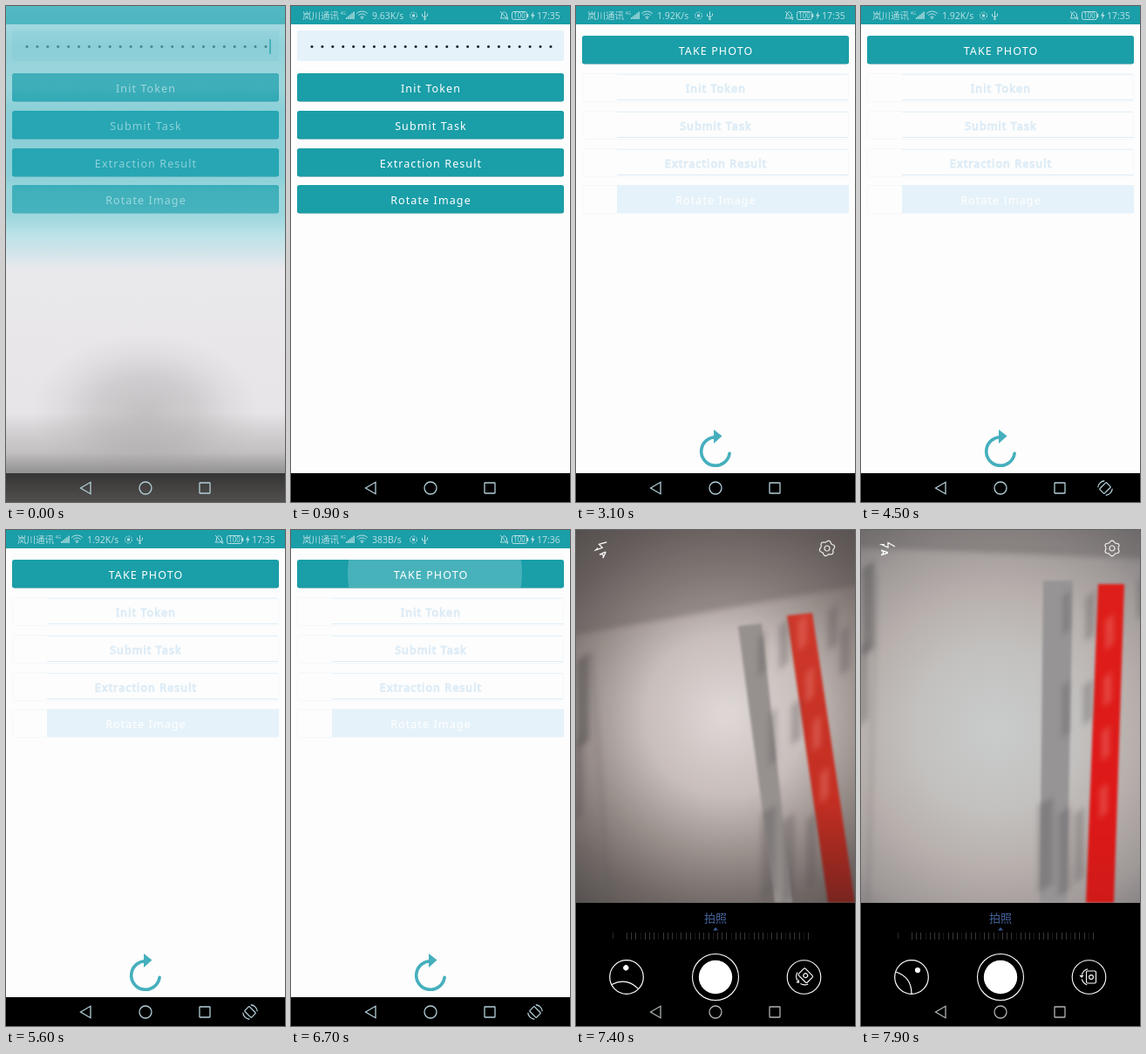
These frames come from a looping animation (320x568 px, 8 s). An HTML page with a canvas:

```html
<!DOCTYPE html>
<html lang="zh">
<head>
<meta charset="utf-8">
<title>Rotate Image demo</title>
<style>
html, body { margin: 0; width: 100%; height: 100%; overflow: hidden; background: #000; }
canvas { display: block; width: 320px; height: 568px; }
</style>
</head>
<body>
<canvas id="stage" width="320" height="568"></canvas>
<script>
const c = document.getElementById('stage').getContext('2d');
const LOOP = 8000, STEP = 100, W = 320, H = 568, NAV = 535, VIEW = 427;
const TEAL = '#1a9ea8', PAPER = '#fdfdfd', FIELD = '#e6f2f9';
const SANS = '"Noto Sans", "Noto Sans CJK SC", sans-serif';
const BUTTONS = [['Init Token', 77], ['Submit Task', 120], ['Extraction Result', 163], ['Rotate Image', 205]];

const clamp = v => Math.max(0, Math.min(1, v));
const mix = (a, b, u) => a + (b - a) * u;
const blend = (a, b, u) => `rgb(${a.map((v, i) => mix(v, b[i], u))})`;

// Same curve as cubic-bezier(.4, 0, .2, 1).
function ease(p) {
  let low = 0, high = 1, s = .5;
  for (let i = 0; i < 14; i++) {
    const x = 1.2 * (1 - s) ** 2 * s + .6 * (1 - s) * s * s + s ** 3;
    x < p ? low = s : high = s;
    s = (low + high) / 2;
  }
  return 3 * s * s - 2 * s ** 3;
}

// Left edge of a page that comes in from the right.
const slide = (t, start) => t < start ? W : t >= start + 350 ? 0 : W * (1 - ease((t - start) / 350));

function rect(x, y, w, h, fill) { c.fillStyle = fill; c.fillRect(x, y, w, h); }

function paint(fill, line) {
  if (fill) { c.fillStyle = fill; c.fill(); }
  if (line) { c.strokeStyle = line; c.stroke(); }
}

function box(x, y, w, h, r, fill, line) {
  c.beginPath();
  c.roundRect(x, y, w, h, r);
  paint(fill, line);
}

function disc(x, y, r, fill, line) {
  c.beginPath();
  c.arc(x, y, r, 0, 7);
  paint(fill, line);
}

function path(points, { fill, line, closed } = {}) {
  c.beginPath();
  points.forEach(([x, y]) => c.lineTo(x, y));
  if (closed || fill) c.closePath();
  paint(fill, line);
}

function arc(x, y, r, from, to) {
  c.beginPath();
  c.arc(x, y, r, from * Math.PI / 180, to * Math.PI / 180);
  c.stroke();
}

function text(s, x, y, size, fill, { align = 'left', weight = 400, gap = 0, outline = false } = {}) {
  c.font = `${weight} ${size}px ${SANS}`;
  c.letterSpacing = gap + 'px';
  c.textAlign = align;
  c.fillStyle = c.strokeStyle = fill;
  outline ? c.strokeText(s, x, y) : c.fillText(s, x, y);
  c.letterSpacing = '0px';
}

const label = (s, y, fill, outline) =>
  text(s, 160.5, y + 21.5, 12.5, fill, { align: 'center', weight: 500, gap: 1.1, outline });

// Runs a drawing with its own origin, angle and opacity.
function at(x, y, angle, draw, alpha = 1) {
  c.save();
  c.translate(x, y);
  c.rotate(angle);
  c.globalAlpha *= alpha;
  draw();
  c.restore();
}

function fade(gradient, stops) {
  stops.forEach(([p, color]) => gradient.addColorStop(p, color));
  return gradient;
}

function button(s, y) {
  box(7, y + .5, 306, 32, 3, '#137f88');
  box(7, y, 306, 32, 3, TEAL);
  label(s, y, '#fff');
}

function ripple(y, age) {
  if (age < 0) return;
  c.save();
  c.beginPath();
  c.roundRect(7, y, 306, 32, 3);
  c.clip();
  disc(165, y + 16, 40 + age * .6, 'rgba(255,255,255,.2)');
  c.restore();
}

function page() {
  rect(0, 0, W, NAV, PAPER);
  rect(0, 0, W, 21, TEAL);
}

function menu(t) {
  page();
  box(7, 28, 306, 35, 2, FIELD);
  for (let i = 0; i < 24; i++) disc(24 + i * 11.91, 46.5, 1.5, '#14232b');
  if (t < 500) rect(302, 38, 2, 17, TEAL);
  BUTTONS.forEach(b => button(...b));
  ripple(205, t - 1300);
}

// Light left behind by the screen that is fading away.
function veil(t) {
  const left = clamp(1 - t / 300) ** 2;
  if (!left) return;
  at(0, 0, 0, () => {
    c.fillStyle = fade(c.createLinearGradient(0, 0, 0, H), [
      [0, 'rgba(122,202,212,.6)'], [.08, 'rgba(92,188,198,.66)'], [.165, 'rgba(88,186,197,.58)'],
      [.21, 'rgba(50,172,188,.56)'], [.34, 'rgba(50,172,188,.56)'], [.37, 'rgba(88,188,198,.6)'],
      [.42, 'rgba(98,192,202,.62)'], [.46, 'rgba(165,217,225,.75)'], [.53, 'rgba(231,230,234,.9)'],
      [.82, 'rgba(229,226,229,.9)'], [.9, 'rgba(172,169,170,.72)'], [.94, 'rgba(85,83,83,.62)'],
      [1, 'rgba(130,128,126,.62)']]);
    c.fillRect(0, 0, W, H);
    c.translate(160, 465);
    c.scale(1.45, 1);
    c.fillStyle = fade(c.createRadialGradient(0, 0, 0, 0, 0, 90),
      [[0, 'rgba(140,138,138,.4)'], [.45, 'rgba(145,143,143,.28)'], [.75, 'rgba(150,148,148,.1)'], [1, 'rgba(150,148,148,0)']]);
    c.fillRect(-90, -90, 180, 160);
  }, left);
}

// Photo page, with the pale traces of the menu on it.
function photo(t) {
  page();
  c.lineWidth = 1;
  box(7.5, 28.5, 305, 34, 2, null, '#f7fafc');
  for (const [s, y] of BUTTONS) {
    box(7.5, y + .5, 305, 32, 3, null, '#f4f8fb');
    if (y === 205) rect(47, y, 266, 32, FIELD);
    else {
      rect(47, y + 1, 265, 1, '#e7f2fa');
      rect(47, y + 30, 265, 1, '#dcecf7');
    }
    label(s, y, y === 205 ? '#fff' : '#dcebf6', y !== 205);
  }
  button('TAKE PHOTO', 34);
  ripple(34, t - 6600);
  c.strokeStyle = '#45afbd';
  c.lineWidth = 3.6;
  c.lineCap = 'round';
  arc(160, 510, 16.3, 8, 275);
  c.lineCap = 'butt';
  path([[158, 485], [167.5, 492.5], [158, 501]], { fill: '#45afbd' });
}

function status(t) {
  const ink = t >= 6900 ? '#a4a6a6' : '#b4dfe2';
  const speed = t < 3100 ? '9.63K/s' : t < 6100 ? '1.92K/s' : '383B/s';
  c.lineWidth = 1;
  text('岚川通讯', 13, 15, 10.5, ink);
  text('4G', 56.5, 10, 5, ink);
  for (let i = 0; i < 5; i++) rect(63 + i * 2.1, 13 - i * 1.6, 1.4, 2 + i * 1.6, ink);
  c.strokeStyle = ink;
  for (const r of [3, 6, 9]) arc(81.5, 15, r, -135, -45);
  disc(81.5, 14, 1.1, ink);
  text(speed, 93, 15, 10.5, ink);
  c.setLineDash([2, 1]);
  disc(140.5, 11, 4, null, ink);
  c.setLineDash([]);
  rect(139, 9.5, 3, 3, ink);
  path([[153.5, 6], [153.5, 15]], { line: ink });
  path([[150.5, 9], [150.5, 11.5], [153.5, 13], [156.5, 11], [156.5, 8.5]], { line: ink });
  disc(153.5, 15, 1.2, ink);
  path([[240, 14], [241.5, 12], [241.5, 9], [244.5, 6.5], [247.5, 9], [247.5, 12], [249, 14]], { line: ink, closed: true });
  path([[240, 6], [249, 16]], { line: ink });
  box(253.5, 6.5, 17, 9, 2, null, ink);
  rect(271, 9, 1.3, 4, ink);
  text('100', 262, 14, 8, ink, { align: 'center' });
  path([[278, 6], [275, 11.5], [277, 11.5], [276, 16], [279.5, 10], [277.5, 10]], { fill: ink });
  text(t < 6700 ? '17:35' : '17:36', 282, 15, 10.5, ink);
  if (t >= 6900) {
    disc(232.5, 9.8, 3.3, null, ink);
    disc(232.5, 9.8, 1, ink);
    path([[230, 12.3], [232.5, 16], [235, 12.3]], { line: ink });
  }
}

function nav(t) {
  const ink = t < 6900 ? '#b3cfd8' : '#aeb2b3';
  c.lineWidth = 1.3;
  path([[85.5, 552], [97, 545.3], [97, 558.7]], { line: ink, closed: true });
  disc(160, 552, 7, null, ink);
  box(222, 546, 12, 12, .5, null, ink);
  if (t < 4500 || t >= 6800) return;
  const turn = ease(clamp((t - 4600) / 600));
  at(280, 552, -Math.PI / 2 * (1 - turn), () => {
    at(0, 0, Math.PI / 4, () => box(-5.5, -3.8, 11, 7.6, 1, null, ink));
    arc(0, 0, 8.3, -85, -5);
    arc(0, 0, 8.3, 95, 175);
  });
}

// Two tilted strips straighten up while the phone is turned.
function preview(t) {
  const u = (t - 7400) / 500, v01 = clamp(u);
  const quad = (a, b) => a.map((p, i) => [mix(p[0], b[i][0], u), mix(p[1], b[i][1], u)]);
  const along = ([a, b, d, e], v) => [mix((a[0] + b[0]) / 2, (d[0] + e[0]) / 2, v), mix(a[1], e[1], v)];
  const smudge = ([x, y], w, h, fill) =>
    path([[x - w / 2, y - h / 2 + 5], [x + w / 2, y - h / 2 - 5], [x + w / 2, y + h / 2 - 5], [x - w / 2, y + h / 2 + 5]], { fill });
  const grey = quad([[186, 110], [213, 107], [248, 427], [228, 427]], [[209, 58], [243, 58], [236, 427], [205, 427]]);
  const red = quad([[242, 98], [271, 95], [320, 427], [289, 427]], [[272, 62], [302, 62], [290, 427], [258, 427]]);

  c.save();
  c.beginPath();
  c.rect(0, 0, W, VIEW);
  c.clip();
  const cx = mix(172, 155, u), cy = mix(212, 228, u);
  rect(0, 0, W, VIEW, fade(c.createRadialGradient(cx, cy, 10, cx, cy, 285), [
    [0, blend([221, 214, 212], [200, 203, 202], v01)],
    [.3, blend([200, 190, 187], [195, 193, 191], v01)],
    [.55, blend([152, 142, 138], [183, 175, 172], v01)],
    [.78, blend([110, 102, 99], [158, 152, 151], v01)],
    [1, blend([80, 76, 75], [120, 117, 118], v01)]]));
  c.filter = 'blur(3px)';
  const edge = quad([[-5, 119], [325, 61]], [[-5, 18], [325, 31]]);
  path([[-5, -5], ...edge, [325, -5]], { fill: 'rgba(82,75,74,.3)' });
  c.lineWidth = 2;
  path(edge, { line: 'rgba(75,70,70,.35)' });
  path(quad([[18, 140], [38, 430]], [[18, 50], [8, 430]]), { line: 'rgba(90,88,90,.4)' });
  c.filter = 'blur(1.5px)';
  path(grey, { fill: blend([150, 144, 142], [151, 148, 150], v01) });
  path(red, { fill: fade(c.createLinearGradient(0, 95, 0, VIEW), [
    [0, blend([206, 56, 42], [222, 30, 26], v01)],
    [.65, blend([196, 46, 34], [222, 24, 24], v01)],
    [1, blend([120, 36, 30], [208, 26, 24], v01)]]) });
  c.filter = 'blur(3px)';
  for (const v of [.06, .24, .41, .59]) smudge(along(red, v + .09 * u), 9, 34, 'rgba(240,140,130,.36)');
  const ink = 'rgba(80,77,79,.3)';
  for (const [v, dx, w, h] of [[.1, 10, 8, 45], [.4, 11, 8, 60], [.82, -10, 17, 100], [.84, 12, 14, 95]]) {
    const [x, y] = along(grey, v);
    smudge([x + dx, y], w, h, ink);
  }
  for (const [v, dx, h] of [[.1, -23, 50], [.37, -22, 45], [.82, -26, 80], [.04, 36, 45], [.12, 46, 50]]) {
    const [x, y] = along(red, v);
    smudge([x + dx, y], 11, h, ink);
  }
  smudge([8, mix(195, 90, u)], 14, 100, 'rgba(60,60,64,.4)');
  smudge([3, mix(285, 175, u)], 10, 90, ink);
  c.restore();
}

function gear() {
  const teeth = Array.from({ length: 60 }, (_, i) => {
    const a = i * Math.PI / 30, r = 8 + Math.cos(6 * a) * .9;
    return [r * Math.cos(a), r * Math.sin(a)];
  });
  path(teeth, { line: '#eee', closed: true });
  disc(0, 0, 3, null, '#eee');
}

function flash() {
  path([[-2, -8], [-6.5, 0], [-1, 0], [-4.5, 7.5], [-4.5, 4]], { line: '#fff' });
  text('A', 5, 8, 10, '#fff', { align: 'center', weight: 600 });
}

function gallery() {
  disc(0, 0, 19.3, null, '#fff');
  disc(-8, -7, 3.1, '#fff');
  c.beginPath();
  c.moveTo(-6, 18);
  c.quadraticCurveTo(0, 0, 19, 0);
  c.stroke();
}

function flip() {
  box(-7, -8, 14, 11, 1.5, null, '#fff');
  disc(0, -2.5, 2.4, null, '#fff');
  arc(0, -1, 9.5, 20, 75);
  arc(0, -1, 9.5, 105, 165);
  path([[-2, 6], [1, 8.5], [-2, 11]], { fill: '#fff' });
}

function camera(t) {
  const turn = Math.PI / 2 * clamp((t - 7250) / 300);
  rect(0, 0, W, H, '#000');
  if (t >= 7300) preview(t);
  c.lineWidth = 1.2;
  at(31, 21, turn, flash);
  at(288, 21, turn, gear);
  at(58, 512, turn, gallery);
  if (t < 7200) return;
  text('拍照', 160, 448.5, 13, '#46659f', { align: 'center', weight: 500 });
  path([[157, 458.5], [160, 455], [163, 458.5]], { fill: '#3c5c98' });
  for (let i = 0; i <= 40; i++) rect(Math.round(58 + i * 5.2), 461, 1, 8, i % 4 === 3 ? '#181818' : '#383838');
  rect(42, 461, 1, 7, '#282828');
  c.lineWidth = 1.1;
  disc(160, 512, 26.5, null, '#fff');
  disc(160, 512, 19.2, '#fff');
  disc(261.5, 512, 19.3, null, '#fff');
  at(261.5, 512, turn, flip);
}

function draw(t) {
  rect(0, 0, W, H, '#000');
  const photoX = slide(t, 1500), cameraX = slide(t, 6755);
  if (photoX > 0) menu(t);
  if (photoX < W) at(photoX, 0, 0, () => photo(t));
  if (photoX > 0) rect(0, 0, W, 21, TEAL);
  rect(0, NAV, W, H - NAV, '#000');
  if (cameraX < W) at(cameraX, 0, 0, () => camera(t));
  if (t >= 100 && t < 7200) status(t);
  veil(t);
  nav(t);
}

const start = performance.now();
function tick() {
  const t = (performance.now() - start) % LOOP;
  draw(Math.floor(t / STEP) * STEP);
  requestAnimationFrame(tick);
}
tick();
</script>
</body>
</html>
```
